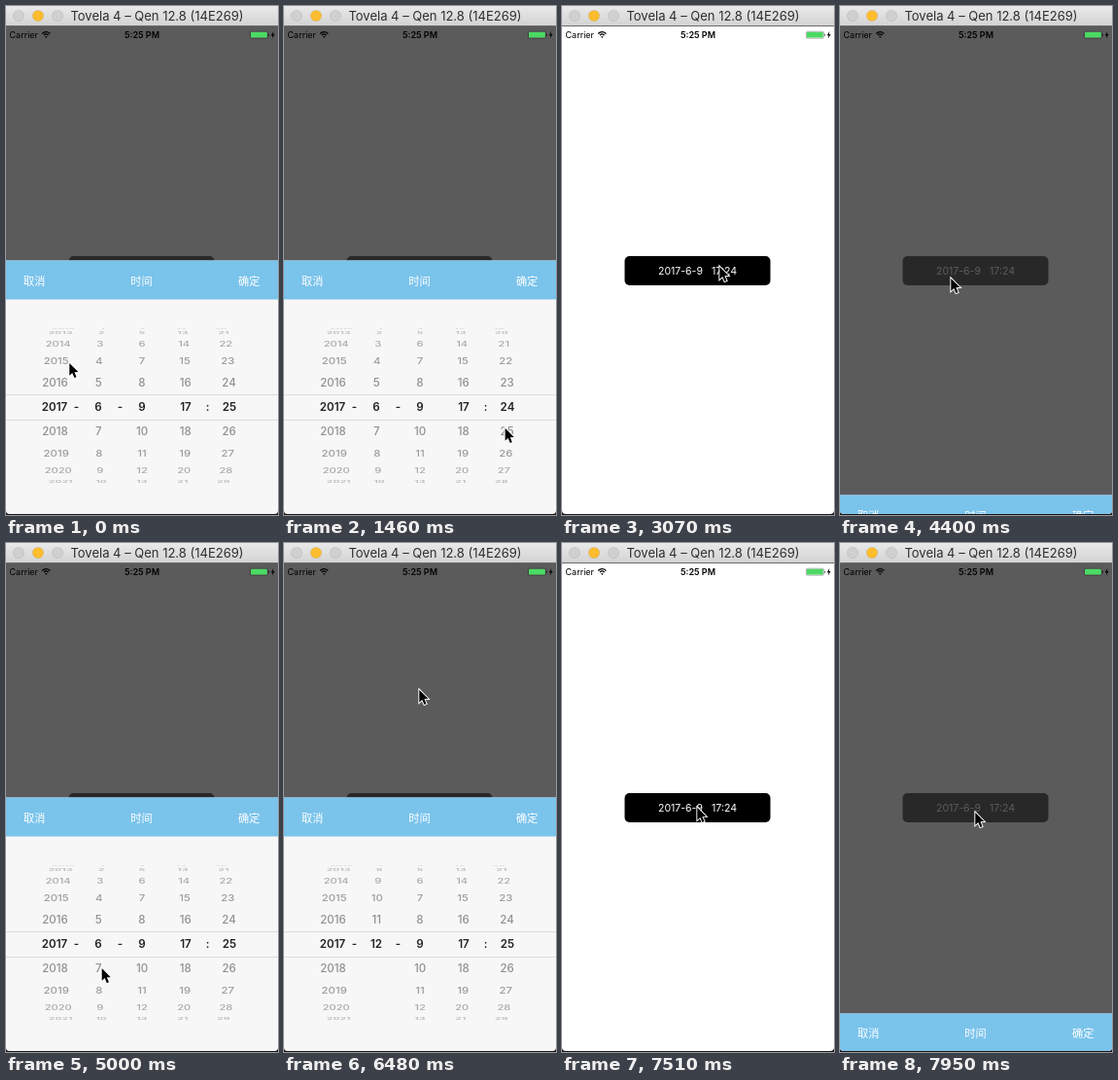
These frames come from a looping animation (280x523 px, 8 s). An HTML page with a canvas:

```html
<!DOCTYPE html>
<html lang="zh">
<head>
<meta charset="utf-8">
<title>Date and time picker</title>
<style>
  html, body { margin: 0; width: 100%; height: 100%; overflow: hidden; background: #fff; }
  canvas { display: block; width: 280px; height: 523px; }
</style>
</head>
<body>
<canvas id="stage"></canvas>
<script>
const W = 280, H = 523, LOOP = 8000, STEP = 147.3, LEAD = 24;
const SHEET_TOP = 261.5, SHEET_H = 261, SLIDE = 3.2;
const SANS = 'Inter, "Noto Sans CJK SC", "Noto Sans CJK", sans-serif';
const DARK = '#222', EDGE = '#1c1416';

const canvas = document.getElementById('stage');
const ratio = window.devicePixelRatio || 1;
canvas.width = W * ratio;
canvas.height = H * ratio;
const ctx = canvas.getContext('2d');
ctx.scale(ratio, ratio);

// Pointer stops, each reached by an eased move between two steps.
const STOPS = [
  { from: 0, to: 0, x: 65, y: 366 },
  { from: 0, to: 6, x: 224, y: 416 },
  { from: 6, to: 9, x: 226, y: 442 },
  { from: 9, to: 15, x: 250, y: 279 },
  { from: 18, to: 21, x: 162, y: 267 },
  { from: 21, to: 28, x: 114, y: 279 },
  { from: 30, to: 35, x: 97, y: 450 },
  { from: 36, to: 43, x: 139, y: 150 },
  { from: 45, to: 52, x: 139, y: 276 }
];

// The standard ease-in-out curve, cubic-bezier(.42, 0, .58, 1).
function ease(x) {
  if (x <= 0) return 0;
  if (x >= 1) return 1;
  let lo = 0, hi = 1, s;
  for (let i = 0; i < 20; i++) {
    s = (lo + hi) / 2;
    const bx = 1.26 * s * (1 - s) ** 2 + 1.74 * s * s * (1 - s) + s ** 3;
    if (bx < x) lo = s; else hi = s;
  }
  return s * s * (3 - 2 * s);
}

function pointerAt(n) {
  return STOPS.reduce((at, stop) => {
    const p = ease((n - stop.from) / (stop.to - stop.from));
    return { x: at.x + (stop.x - at.x) * p, y: at.y + (stop.y - at.y) * p };
  }, STOPS[0]);
}

function text(str, x, y, size, color, align = 'center', weight = 400) {
  ctx.font = `${weight} ${size}px ${SANS}`;
  ctx.textAlign = align;
  ctx.fillStyle = color;
  ctx.fillText(str, x, y + size * 0.36);
}

function box(x, y, w, h, color, r = 0) {
  ctx.fillStyle = color;
  ctx.beginPath();
  ctx.roundRect(x, y, w, h, r);
  ctx.fill();
}

function outline(points) {
  ctx.beginPath();
  points.forEach(p => ctx.lineTo(...p));
  ctx.closePath();
}

function shape(points, color) {
  outline(points);
  ctx.fillStyle = color;
  ctx.fill();
}

function titleBar() {
  const g = ctx.createLinearGradient(0, 0, 0, 21);
  g.addColorStop(0, '#e9e9e9');
  g.addColorStop(1, '#d2d2d2');
  box(0, 0, W, 20, g);
  box(0, 20, W, 1, '#6a6a6a');
  ['#d0d0d0', '#fdbd2e', '#d0d0d0'].forEach((fill, i) => {
    ctx.beginPath();
    ctx.arc(13 + 20 * i, 10, 5.6, 0, 7);
    ctx.fillStyle = fill;
    ctx.fill();
    ctx.strokeStyle = 'rgba(0,0,0,.1)';
    ctx.lineWidth = 0.8;
    ctx.stroke();
  });
  text('Tovela 4 – Qen 12.8 (14E269)', 155.5, 10.3, 13, '#2e2e2e');
}

function statusBar() {
  text('Carrier', 3.5, 29.5, 9, '#000', 'left');
  text('5:25 PM', 140, 29.5, 9, '#000', 'center', 600);
  ctx.strokeStyle = '#000';
  ctx.lineWidth = 1.3;
  [3.2, 5.6].forEach(r => {
    ctx.beginPath();
    ctx.arc(41.3, 32.3, r, -Math.PI * 0.76, -Math.PI * 0.24);
    ctx.stroke();
  });
  shape([[41.3, 33], [39.9, 31.3], [42.7, 31.3]], '#000');
  ctx.strokeStyle = 'rgba(0,0,0,.5)';
  ctx.lineWidth = 0.6;
  ctx.beginPath();
  ctx.roundRect(251.4, 26.2, 18, 7, 1.3);
  ctx.stroke();
  box(252, 26.8, 16.8, 5.8, '#4cd964', 0.6);
  box(270, 28.5, 1, 2.5, 'rgba(0,0,0,.5)', 0.5);
  shape([[275.4, 26], [272.8, 30.2], [274.5, 30.2], [273.8, 33.4], [276.6, 28.9], [274.9, 28.9]], '#000');
}

function valueButton() {
  box(64.5, 257, 150, 30, '#000', 5);
  text('2017-6-9', 99, 272, 10.5, '#fff', 'left');
  text('17:24', 154, 272, 10.6, '#fff', 'left');
}

// One picker column projected on a cylinder.
function wheel(x, value, min, max, mid) {
  const first = Math.max(min, Math.ceil(value - 5));
  const last = Math.min(max, Math.floor(value + 4.5));
  for (let v = first; v <= last; v++) {
    const d = v - value, angle = d * 17.9 * Math.PI / 180, c = Math.cos(angle);
    const near = 1 - 0.1 * (1 - c), dist = Math.abs(d);
    const grey = Math.round(132 + 12 * dist);
    ctx.save();
    ctx.translate(140 + (x - 140) * near, mid + 80.8 * Math.sin(angle));
    ctx.scale(near, Math.max(c, 0.07));
    if (dist < 0.5) text(v, 0, 0, 11.6, DARK, 'center', 600);
    else text(v, 0, 0, 11.6, `rgb(${grey},${grey},${grey})`, 'center', 500);
    ctx.restore();
  }
}

function sheet(top, month, minute) {
  box(0, top, W, SHEET_H, '#f7f7f7');
  box(0, top, W, 40, '#7ac3eb');
  text('取消', 18, top + 21, 11.2, '#fff', 'left');
  text('时间', 139.5, top + 21, 11.2, '#fff');
  text('确定', 261.5, top + 21, 11.2, '#fff', 'right');
  const mid = top + 150.8;
  [-13.3, 12.7].forEach(dy => box(0, mid + dy, W, 1, '#dcdcdc'));
  wheel(50, 2017, 1970, 2100, mid);
  wheel(95, month, 1, 12, mid);
  wheel(140, 9, 1, 30, mid);
  wheel(185, 17, 0, 23, mid);
  wheel(230, minute, 0, 59, mid);
  [['-', 72.5], ['-', 117.5], [':', 207.5]].forEach(([s, x]) => text(s, x, mid, 11.6, DARK, 'center', 600));
}

function pointer({ x, y }) {
  ctx.save();
  ctx.translate(x + 0.3, y + 0.9);
  ctx.scale(0.95, 0.95);
  outline([[0, 0], [0, 13.6], [3.1, 10.7], [5.4, 16], [7.6, 15], [5.4, 9.9], [9.6, 9.7]]);
  ctx.lineWidth = 2;
  ctx.strokeStyle = '#fff';
  ctx.stroke();
  ctx.fillStyle = '#000';
  ctx.fill();
  ctx.restore();
}

function draw(time) {
  const n = Math.floor((time % LOOP + LEAD) / STEP);
  const slide = start => ease((n - start) / SLIDE);
  const open = 1 - slide(16.82) + slide(29.38) - slide(44.82) + slide(53.14);
  const dimmed = n < 21 || (n >= 30 && n < 49) || n >= 54;
  const minute = n < 25 ? 25 - ease((n - 6) / 3) : 25;
  const month = n < 50 ? 6 + 6 * ease((n - 36) / 5) : 6;

  box(0, 0, W, H, EDGE);
  ctx.save();
  ctx.beginPath();
  ctx.roundRect(0, 0, W, H - 1, [0, 0, 4, 4]);
  ctx.clip();
  box(0, 0, W, H, '#fff');
  valueButton();
  if (dimmed) box(0, 21, W, H - 21, 'rgba(50,50,50,.8)');
  statusBar();
  if (open > 0.002) sheet(SHEET_TOP + SHEET_H * (1 - open), month, minute);
  titleBar();
  ctx.restore();
  pointer(pointerAt(n));
}

const begin = performance.now();
function tick() {
  draw(performance.now() - begin);
  requestAnimationFrame(tick);
}
tick();
</script>
</body>
</html>
```
